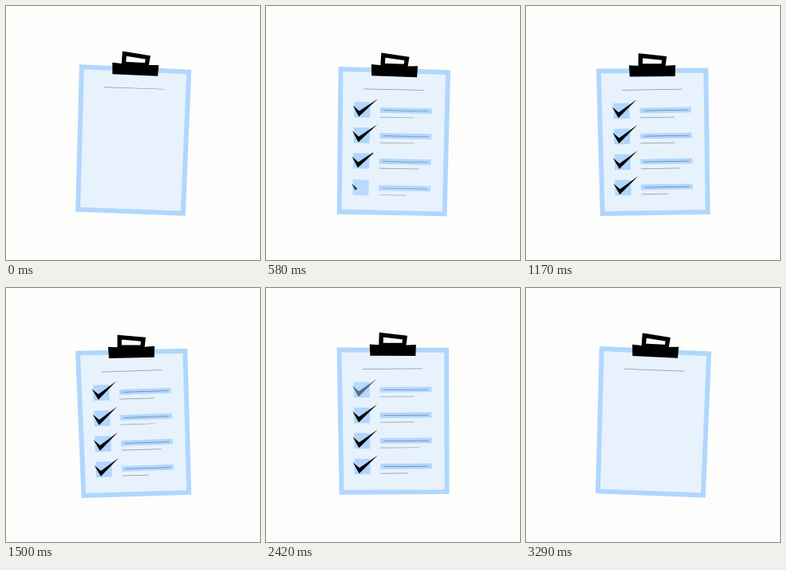
Write an HTML page with a canvas that moves like this. It is 318 px wide and 318 px high and loops after 3330 ms.

```html
<!DOCTYPE html>
<html lang="en">
<head>
<meta charset="utf-8">
<title>Checklist</title>
<style>
  html, body { margin: 0; width: 100%; height: 100%; overflow: hidden; background: #fdfdfc; }
  canvas { display: block; width: 100vw; height: 100vh; }
</style>
</head>
<body>
<canvas id="stage"></canvas>
<script>
const LOOP = 3330, SIZE = 318;
const PAPER = '#e7f2fc', BLUE = '#b1d6fe', BACK = '#fdfdfc', INK = '#000';
const underlines = [43, 43, 49.5, 33.5];   // one per row

const canvas = document.getElementById('stage');
const ctx = canvas.getContext('2d');
const scale = window.devicePixelRatio || 1;
canvas.width = canvas.height = SIZE * scale;

// Progress from 0 to 1, beginning at start
const ramp = (t, start, length) => Math.min(1, Math.max(0, (t - start) / length));

function polygon(...points) {
  const path = new Path2D();
  points.forEach(([x, y]) => path.lineTo(x, y));
  path.closePath();
  return path;
}

const board = polygon([92.2, 78.6], [226.6, 80.2], [225.6, 257.5], [93.8, 257.2]);
const clamp = polygon([130.4, 72], [160, 74.2], [188.5, 73], [187.8, 87], [131, 86.3]);
const handle = polygon([145.1, 60.3], [174.7, 64], [173.4, 73.5], [144.6, 73]);
const check = polygon([-1.8, 4.4], [6.3, 11.5], [29.3, -4.2], [6, 18.4]);

function outline(path, color, width) {
  ctx.strokeStyle = color;
  ctx.lineWidth = width;
  ctx.stroke(path);
}

function rule(x, y, length) {
  ctx.fillStyle = 'rgba(0,0,0,0.4)';
  ctx.fillRect(x, y - 0.35, length, 0.7);
}

// The check is revealed along its stroke, inside its own outline
function tick(shown) {
  ctx.save();
  ctx.clip(check);
  ctx.setLineDash([46 * shown, 100]);
  ctx.lineWidth = 10;
  ctx.strokeStyle = INK;
  ctx.beginPath();
  ctx.moveTo(-2.5, 3);
  ctx.lineTo(6.3, 15.5);
  ctx.lineTo(30, -5);
  ctx.stroke();
  ctx.restore();
}

function drawRow(underline, i, t) {
  const enter = 125 * i, leave = 2340 + 150 * i;
  const arrive = 1 - (1 - ramp(t, 40 + enter, 250)) ** 2;
  const drawn = ramp(t, 154 + enter, 205);

  ctx.save();
  ctx.translate(110, 119.3 + 32 * i + 12 * (1 - arrive));

  ctx.globalAlpha = arrive * (1 - ramp(t, leave + 60, 200));
  ctx.fillStyle = BLUE;
  ctx.fillRect(0, 0, 20, 19.5);
  ctx.fillRect(32.7, 6.4, 64.6, 6.7);
  rule(37.2, 10, 56);
  rule(32.8, 18.6, underline);

  ctx.globalAlpha = Math.min(1, drawn * 3) * (1 - ramp(t, leave, 160));
  tick(drawn);
  ctx.restore();
}

function drawBoard() {
  ctx.fillStyle = PAPER;
  ctx.fill(board);
  outline(board, BLUE, 5.9);
  outline(handle, INK, 5.4);
  ctx.fillStyle = INK;
  ctx.fill(clamp);
  rule(121.2, 103.1, 75.2);
}

function frame(now) {
  const t = now % LOOP;
  const phase = 2 * Math.PI * (t - 50) / LOOP;

  ctx.setTransform(scale, 0, 0, scale, 0, 0);
  ctx.fillStyle = BACK;
  ctx.fillRect(0, 0, SIZE, SIZE);

  // Gentle sway and bob
  ctx.translate(159.5, 150 + 1.9 * Math.sin(phase));
  ctx.rotate(2.05 * Math.PI / 180 * Math.cos(phase));
  ctx.translate(-159.5, -150);

  drawBoard();
  underlines.forEach((length, i) => drawRow(length, i, t));
}

const start = performance.now();
function loop() {
  frame(performance.now() - start);
  requestAnimationFrame(loop);
}
loop();
</script>
</body>
</html>
```
